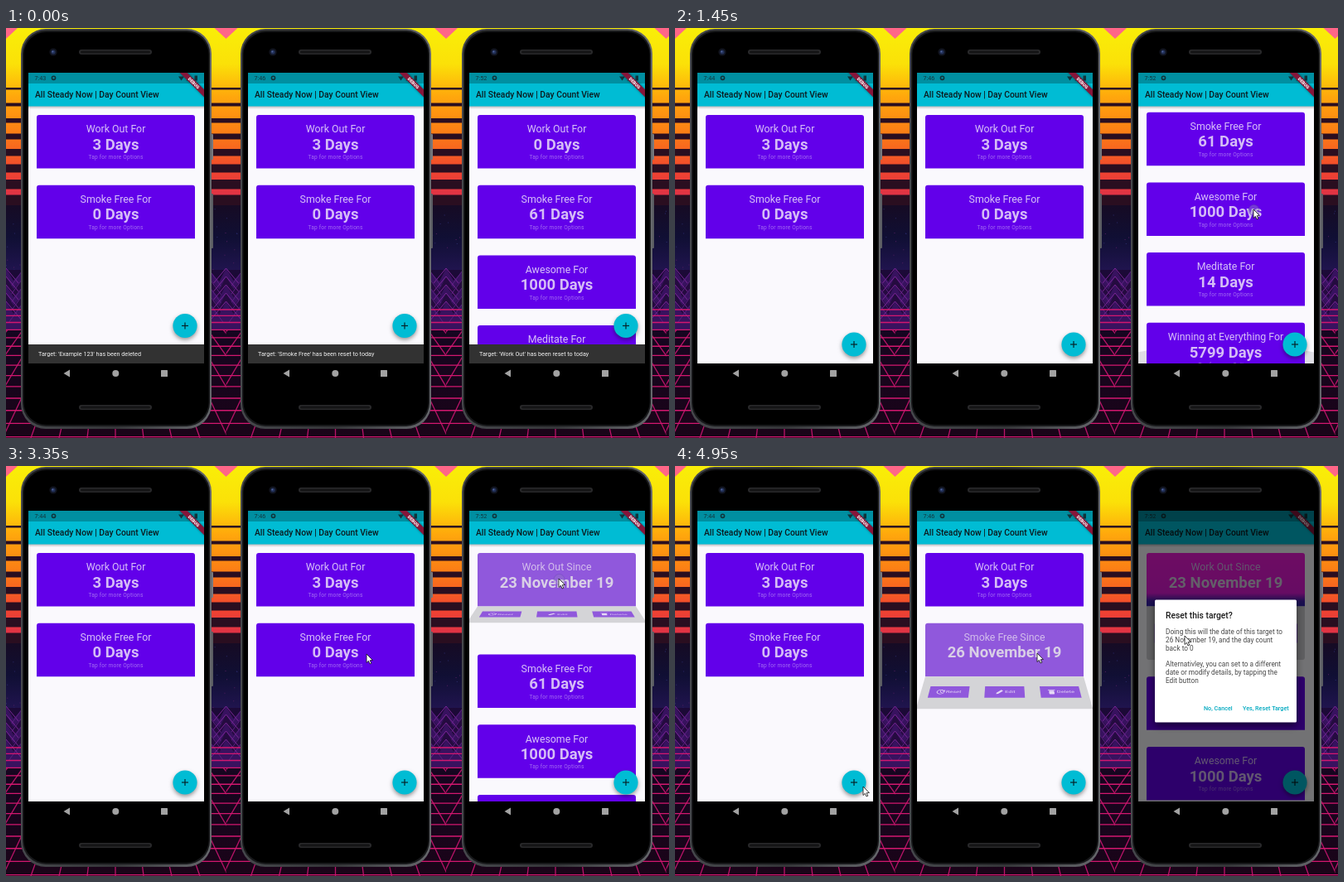
Recreate the animation shown at these times as an HTML page with a canvas. Size 800 px wide and 495 px high, loop 5 s.

```html
<!DOCTYPE html>
<html lang="en">
<head>
<meta charset="utf-8">
<title>Day count app</title>
<style>
html, body { margin: 0; width: 100%; height: 100%; overflow: hidden; background: #000; }
canvas { display: block; width: 800px; height: 495px; }
</style>
</head>
<body>
<canvas id="stage" width="800" height="495"></canvas>
<script>
const W = 800, H = 495, LOOP = 5000;
const TEAL = '#00bcd4', PURPLE = '#6200ea', INNER = '#9058dc';
const CX = 132.5, CARD = { x: 37, w: 191, h: 64.5, top: 105, pitch: 84.7 };
const TITLE = 'All Steady Now | Day Count View';
let g = document.getElementById('stage').getContext('2d');

const clamp = v => Math.max(0, Math.min(1, v));
const ramp = (t, a, b) => clamp((t - a) / (b - a));
const ease = u => u * u * (3 - 2 * u);
const flat = (x, y) => [x, y];

// Interpolates between rows of [time, value, value...].
function track(rows, t) {
  if (t <= rows[0][0]) return rows[0].slice(1);
  for (let i = 1; i < rows.length; i++) {
    const a = rows[i - 1], b = rows[i];
    if (t < b[0]) {
      const u = ease(ramp(t, a[0], b[0]));
      return a.slice(1).map((v, k) => v + (b[k + 1] - v) * u);
    }
  }
  return rows[rows.length - 1].slice(1);
}

function gradient(x1, y1, x2, y2, stops) {
  const fill = g.createLinearGradient(x1, y1, x2, y2);
  stops.forEach(([at, color]) => fill.addColorStop(at, color));
  return fill;
}

function box(x, y, w, h, color, r = 0) {
  g.fillStyle = color;
  g.beginPath();
  g.roundRect(x, y, w, h, r);
  g.fill();
}

function poly(points, color) {
  g.fillStyle = color;
  g.beginPath();
  points.forEach(p => g.lineTo(...p));
  g.closePath();
  g.fill();
}

function disc(x, y, r, color) {
  g.fillStyle = color;
  g.beginPath();
  g.arc(x, y, r, 0, 7);
  g.fill();
}

function line(x1, y1, x2, y2, color, width = 1) {
  g.strokeStyle = color;
  g.lineWidth = width;
  g.beginPath();
  g.moveTo(x1, y1);
  g.lineTo(x2, y2);
  g.stroke();
}

function text(s, x, y, size, color, weight = 400, align = 'left') {
  g.font = `${weight} ${size}px Roboto, sans-serif`;
  g.fillStyle = color;
  g.textAlign = align;
  g.fillText(s, x, y);
}

// Runs draw() in the plane that map describes, around one point.
function place(map, x, y, draw) {
  const [a, b] = map(x, y), [rx, ry] = map(x + 1, y), [dx, dy] = map(x, y + 1);
  g.save();
  g.transform(rx - a, ry - b, dx - a, dy - b, a, b);
  draw();
  g.restore();
}

const quad = (map, x, y, w, h, color) =>
  poly([map(x, y), map(x + w, y), map(x + w, y + h), map(x, y + h)], color);

// Perspective turn of a flap around a horizontal hinge.
function fold(hinge, angle) {
  const c = Math.abs(Math.cos(angle)), k = 0.00194 * Math.sin(angle);
  return (x, y) => {
    const s = 1 / (1 - k * Math.abs(y - hinge));
    return [CX + (x - CX) * s, hinge + (y - hinge) * c * s];
  };
}

function drawBackdrop() {
  let seed = 7;
  const random = () => (seed = seed * 16807 % 2147483647) / 2147483647;
  box(0, 0, W, 216, gradient(0, 0, 0, 216, [[0, '#f9ee08'], [0.2, '#fbe108'], [0.38, '#ffa80c'],
    [0.6, '#fb7a16'], [0.8, '#f04430'], [1, '#d82a50']]));
  for (let i = 0; i < 8; i++) box(0, 72 + i * 18.5, W, 2.5 + i * 1.5, '#2a0e20');
  box(0, 214, W, 78, gradient(0, 214, 0, 292, [[0, '#160b24'], [0.5, '#100f34'], [1, '#20144e']]));
  for (let i = 0; i < 260; i++)
    box(random() * W, 218 + random() * 74, 1, 1, random() < 0.5 ? '#2c2c6c' : '#541f60');
  box(0, 292, W, 203, gradient(0, 292, 0, 495, [[0, '#1c0a38'], [0.4, '#16051f'], [1, '#1a0418']]));

  for (let n = 0; n < 4; n++) {
    const edge = n * 265.5, mid = edge + 132;
    poly([[edge - 14, 0], [edge + 14, 0], [edge, 13]], '#ff6688');
    g.save();
    g.beginPath();
    g.rect(edge, 330, 265.5, 165);
    g.clip();
    for (let i = -14; i <= 14; i++) line(mid + i * 11, 300, mid + i * 34, 495, '#b81468', 1.3);
    g.restore();
    for (let i = 0; i < 5; i++) {
      const y = 290 + i * 10;
      poly([[edge - 30, y + 34], [edge - 18, y + 5], [edge - 8, y + 16], [edge, y],
            [edge + 9, y + 15], [edge + 19, y + 4], [edge + 30, y + 34]], i % 2 ? '#250b40' : '#38125f');
      for (const d of [-1, 1]) {
        line(edge, y, edge + d * 20, y + 24, '#7a2596');
        line(edge + d * 19, y + 4, edge + d * 3, y + 26, '#58207f');
      }
    }
  }
  for (let i = 0; i < 14; i++) {
    const y = 340 + i * 7 + i * i * 0.37;
    line(0, y, W, y, '#d3176f', 1.3);
  }
}

function drawBody() {
  box(246, 128, 4, 31, '#77797f', 1);
  box(246, 200, 4, 66, '#5a5c62', 1);
  box(18, 1, 230, 483, gradient(18, 0, 248, 0, [[0, '#46484c'], [0.5, '#343538'], [1, '#66686c']]), 30);
  box(20, 3, 226, 478, '#18191b', 28);
  box(21.5, 5, 223, 474, '#000', 27);
  disc(57, 29, 4.6, '#11141f');
  disc(57, 29, 2.6, '#223058');
  disc(56.4, 28.6, 1, '#5568a0');
  for (const y of [26, 455]) {
    box(88, y, 88, 6, '#29292b', 3);
    box(90, y + 1.5, 84, 3, '#151516', 1.5);
  }
  poly([[69.5, 417], [77, 412.5], [77, 421.5]], '#a2a2a2');
  disc(132.3, 417, 4, '#a2a2a2');
  box(187, 413, 8, 8, '#a2a2a2', 0.5);
}

function drawHeader(time) {
  box(27, 94, 212, 4, gradient(0, 94, 0, 98, [[0, 'rgba(0,0,0,.28)'], [1, 'rgba(0,0,0,0)']]));
  box(27, 54, 212, 13, '#008fa1');
  box(27, 67, 212, 27.5, TEAL);
  text(time, 34.5, 63, 7.2, '#123840');
  g.strokeStyle = '#10343c';
  g.lineWidth = 1.6;
  g.beginPath();
  g.arc(57.5, 60.3, 2.1, 0, 7);
  g.stroke();
  poly([[208, 58.5], [215, 58.5], [211.5, 63.5]], '#10343c');
  poly([[223, 57.5], [223, 63.5], [217.5, 63.5]], '#10343c');
  box(227.5, 57.5, 3.5, 6, '#10343c');
  text(TITLE, 35, 84.3, 10.3, '#0b1a1e', 500);

  g.save();
  g.translate(239, 54);
  g.rotate(Math.PI / 4);
  g.shadowColor = 'rgba(0,0,0,.5)';
  g.shadowBlur = 3;
  box(-22, 14.4, 44, 6.3, '#86163a');
  g.shadowBlur = 0;
  text('DEBUG', 0, 19.5, 5.3, '#fff', 900, 'center');
  g.restore();
}

function drawFace(map, y, name, value) {
  if (map === flat) box(CARD.x, y, CARD.w, CARD.h, PURPLE, [3, 3, 0, 0]);
  else quad(map, CARD.x, y, CARD.w, CARD.h, PURPLE);
  const put = (s, dy, size, color, weight) =>
    place(map, CX, y + dy, () => text(s, 0, 0, size, color, weight, 'center'));
  put(`${name} For`, 21.3, 12.36, '#d8c0f8');
  put(`${value} Days`, 41.7, 18.5, '#d5bcf6', 700);
  g.letterSpacing = '0.2px';
  put('Tap for more Options', 53.2, 6.6, '#a36cf1');
  g.letterSpacing = '0px';
}

const icons = [
  () => {
    g.lineWidth = 1;
    g.beginPath();
    g.arc(0, 0, 4, 0.2, 5.6);
    g.stroke();
    line(0, -2, 0, 0.5, g.strokeStyle);
    line(0, 0.5, 2, 1.5, g.strokeStyle);
    poly([[4.8, -4], [4.8, 0], [1.6, -1]], g.strokeStyle);
  },
  () => poly([[-4, 4], [-3.6, 1.6], [2, -4], [4, -2], [-1.6, 3.6]], '#e6daf6'),
  () => {
    box(-3, -2.5, 6, 7, '#e6daf6', 0.8);
    box(-4, -4.5, 8, 1.2, '#e6daf6');
  }
];

function drawPanel(map, y) {
  if (map === flat) box(CARD.x, y, CARD.w, CARD.h, '#d0d0d4', [0, 0, 3, 3]);
  else quad(map, CARD.x, y, CARD.w, CARD.h, '#d4d4d7');
  ['Reset', 'Edit', 'Delete'].forEach((label, i) => {
    const x = 46.5 + i * 63.5, nudge = i === 1 ? 4 : 0;
    quad(map, x, y + 21, 45.5, 23, INNER);
    place(map, x + 13 + nudge, y + 32.5, () => {
      g.strokeStyle = '#e6daf6';
      icons[i]();
      text(label, 6, 2.5, 7.1, '#e2d4f5');
    });
  });
}

function drawFoldingCard(y, card, p, dimmed) {
  const hinge = y + CARD.h, angle = p * Math.PI;
  const color = dimmed
    ? gradient(0, y, 0, hinge, [[0, '#f01ad8'], [0.75, '#e01ad8'], [0.9, '#4020b0'], [1, '#3020b0']])
    : INNER;
  box(CARD.x, y, CARD.w, CARD.h, color, [3, 3, 0, 0]);
  text(`${card.name} Since`, CX, y + 21.3, 12.36, '#d3bdec', 400, 'center');
  text(card.since, CX, y + 41.7, 18.5, '#d9cfe6', 700, 'center');
  if (p < 0.5) drawFace(fold(hinge, angle), y, card.name, card.value);
  else drawPanel(p < 1 ? fold(hinge, angle) : flat, hinge);
}

function drawGlow(strength) {
  g.fillStyle = `rgba(150,150,165,${0.28 * strength})`;
  g.beginPath();
  g.ellipse(CX, 405, 135, 22 * strength, 0, 0, 7);
  g.fill();
}

function drawFab(y) {
  g.save();
  g.shadowColor = 'rgba(0,0,0,.4)';
  g.shadowBlur = 5;
  g.shadowOffsetY = 2.5;
  disc(216, y, 14.6, TEAL);
  g.restore();
  line(212, y, 220, y, '#06242a', 1.2);
  line(216, y - 4, 216, y + 4, '#06242a', 1.2);
}

function drawDialog(alpha) {
  g.save();
  g.globalAlpha = alpha;
  box(27, 54, 212, 351, 'rgba(0,0,0,.54)');
  g.shadowColor = 'rgba(0,0,0,.5)';
  g.shadowBlur = 8;
  g.shadowOffsetY = 4;
  box(47, 161.5, 171, 148, '#fff', 1.5);
  g.shadowColor = 'transparent';
  text('Reset this target?', 60, 184, 10.3, '#1c1c1c', 500);
  ['Doing this will the date of this target to', '26 November 19, and the day count', 'back to 0', '',
   'Alternativley, you can set to a different', 'date or modify details, by tapping the', 'Edit button']
    .forEach((s, i) => text(s, 60, 203.3 + i * 9.75, 8.24, '#484848'));
  text('No, Cancel', 106, 295.3, 7.2, '#00a9c0', 500);
  text('Yes, Reset Target', 153, 295.3, 7.2, '#00a9c0', 500);
  g.restore();
}

function drawPhone(offset, app) {
  g.save();
  g.translate(offset, 0);
  drawBody();
  g.beginPath();
  g.rect(27, 54, 212, 351);
  g.clip();
  box(27, 54, 212, 351, '#faf9fd');
  if (app.glow) drawGlow(app.glow);
  const shift = i => i > app.open ? CARD.h * app.fold : 0;
  app.cards.forEach((card, i) => {
    const y = CARD.top + i * CARD.pitch - app.scroll + shift(i);
    if (i !== app.open || !app.fold) drawFace(flat, y, card.name, card.value);
  });
  if (app.fold)
    drawFoldingCard(CARD.top + app.open * CARD.pitch - app.scroll, app.cards[app.open], app.fold, app.dialog > 0);
  drawHeader(app.time);
  drawFab(app.snack ? 359.5 : 382);
  if (app.snack) {
    box(27, 382, 212, 23, '#323232');
    text(app.snack, 39, 396.2, 7.2, '#f2f2f2');
  }
  if (app.dialog) drawDialog(app.dialog);
  g.restore();
}

function drawCursor([x, y], touch) {
  if (touch > 0) {
    disc(x + 0.5, y + 1, 6.5, `rgba(150,140,190,${0.4 * touch})`);
    g.strokeStyle = `rgba(90,60,170,${0.5 * touch})`;
    g.lineWidth = 1;
    g.stroke();
  }
  const shape = [[0, 0], [0, 10.5], [2.4, 8.3], [4, 12], [5.8, 11.2], [4.2, 7.7], [7.4, 7.5]];
  poly(shape.map(([a, b]) => [x + a, y + b]), '#fff');
  g.strokeStyle = '#111';
  g.lineWidth = 0.8;
  g.stroke();
}

const pulse = (t, a, b, fade = 200) => ramp(t, a, a + 60) * (1 - ramp(t, b, b + fade));

const paths = {
  left: [[4500, 246, 430], [4800, 227, 387]],
  middle: [[2050, 498, 300], [2350, 444, 230], [2700, 444, 230], [3200, 435, 227], [4950, 437, 226]],
  right: [[250, 716, 400], [500, 684, 326], [900, 686, 262], [1400, 698, 219], [1550, 698, 219],
          [2050, 682, 312], [2400, 637, 278], [2680, 667, 136], [3450, 667, 136], [3950, 614, 209], [4900, 615, 205]]
};
const scrolling = [[500, 0], [900, 61], [1150, 88], [1600, 88], [2050, 0]];

const workOut = value => ({ name: 'Work Out', value, since: '23 November 19' });
const smokeFree = value => ({ name: 'Smoke Free', value, since: '26 November 19' });
const others = [
  { name: 'Awesome', value: 1000 },
  { name: 'Meditate', value: 14 },
  { name: 'Winning at Everything', value: 5799 }
];

const backdrop = document.createElement('canvas');
backdrop.width = W;
backdrop.height = H;
const screen2d = g;
g = backdrop.getContext('2d');
drawBackdrop();
g = screen2d;

function render(t) {
  const intro = t < 50;
  const base = { scroll: 0, open: -1, fold: 0, glow: 0, dialog: 0 };
  g.drawImage(backdrop, 0, 0);
  drawPhone(0, {
    ...base, time: intro ? '7:43' : '7:44', cards: [workOut(3), smokeFree(0)],
    snack: intro && "Target: 'Example 123' has been deleted"
  });
  drawPhone(265, {
    ...base, time: '7:46', cards: [workOut(3), smokeFree(0)],
    open: 1, fold: ramp(t, 3955, 5415),
    snack: intro && "Target: 'Smoke Free' has been reset to today"
  });
  drawPhone(532, {
    ...base, time: '7:52', cards: [workOut(intro ? 0 : 3), smokeFree(61), ...others],
    scroll: track(scrolling, t)[0], open: 0, fold: ramp(t, 2705, 3805),
    glow: ramp(t, 1150, 1400) * (1 - ramp(t, 1550, 1750)), dialog: ramp(t, 4450, 4600),
    snack: intro && "Target: 'Work Out' has been reset to today"
  });
  if (t >= 4500) drawCursor(track(paths.left, t), 0);
  if (t >= 2050) drawCursor(track(paths.middle, t), pulse(t, 3920, 4150));
  if (t >= 250)
    drawCursor(track(paths.right, t), pulse(t, 500, 2050) + 0.6 * pulse(t, 2680, 3350) + pulse(t, 4300, 4420));
}

function tick() {
  render(performance.now() % LOOP);
  requestAnimationFrame(tick);
}
tick();
</script>
</body>
</html>
```
